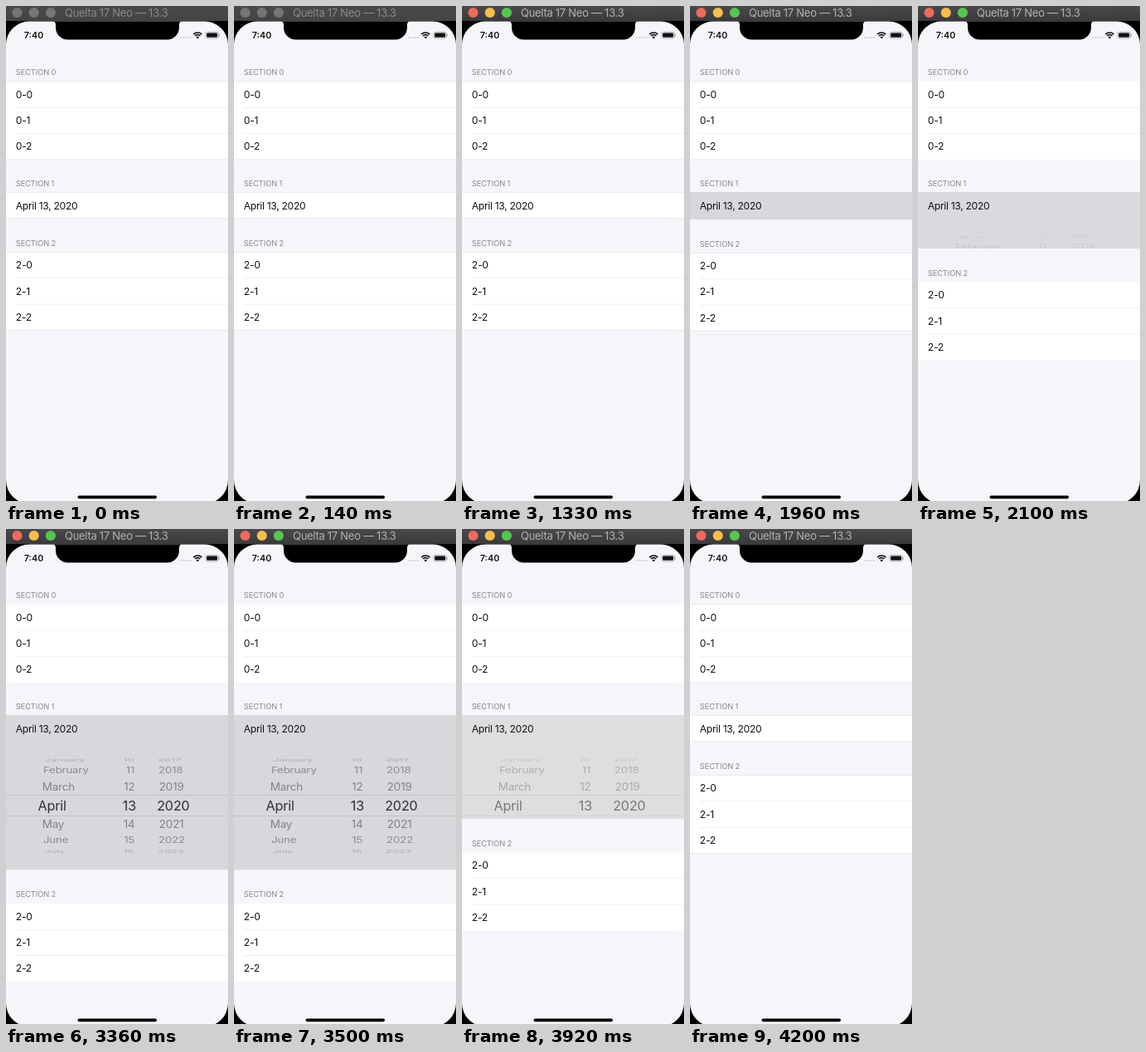
Recreate the animation shown at these times as an HTML page with a canvas. Size 268 by 596 pixels, loop 4970 ms.

```html
<!DOCTYPE html>
<html lang="en">
<head>
<meta charset="utf-8">
<title>Inline date picker</title>
<style>
  html, body { margin: 0; width: 100%; height: 100%; overflow: hidden; background: #000; }
  canvas { display: block; width: 268px; height: 596px; }
</style>
</head>
<body>
<canvas id="stage"></canvas>
<script>
const W = 268, H = 596, LOOP = 4970, STEP = 70;
const ROW = 31.4, PICKER = 154.4, CELL_TOP = 224.5;
const FONT = 'Inter, Roboto, sans-serif';
const BACK = '#f6f5fa', LINE = '#e6e5e9', PRESSED = '#d9d7db';

const canvas = document.getElementById('stage');
const dpr = window.devicePixelRatio || 1;
canvas.width = W * dpr;
canvas.height = H * dpr;
const ctx = canvas.getContext('2d');

function rect(x, y, w, h, color) {
  ctx.fillStyle = color;
  ctx.fillRect(x, y, w, h);
}

function disc(x, y, r, color) {
  ctx.fillStyle = color;
  ctx.beginPath();
  ctx.arc(x, y, r, 0, Math.PI * 2);
  ctx.fill();
}

function pill(x, y, w, h, r, color) {
  ctx.fillStyle = color;
  ctx.beginPath();
  ctx.roundRect(x, y, w, h, r);
  ctx.fill();
}

// y is the middle of the capitals
function text(str, x, y, size, color, { weight = 400, spacing = 0, align = 'left' } = {}) {
  ctx.font = `${weight} ${size}px ${FONT}`;
  ctx.letterSpacing = spacing + 'px';
  ctx.textAlign = align;
  ctx.fillStyle = color;
  ctx.fillText(str, x, y + size * 0.364);
}

// cubic-bezier(.42, 0, .58, 1)
function easeInOut(x) {
  if (x <= 0) return 0;
  if (x >= 1) return 1;
  let lo = 0, hi = 1;
  for (let i = 0; i < 20; i++) {
    const s = (lo + hi) / 2, r = 1 - s;
    if (1.26 * s * r * r + 1.74 * s * s * r + s * s * s < x) lo = s; else hi = s;
  }
  return lo * lo * (3 - 2 * lo);
}

function titleBar(active) {
  const shade = ctx.createLinearGradient(0, 0, 0, 18);
  shade.addColorStop(0, active ? '#4a494b' : '#4b484b');
  shade.addColorStop(1, active ? '#3b393b' : '#464346');
  rect(0, 0, W, 18, shade);
  const lights = active ? ['#ec6a5e', '#f5bf4f', '#58c553'] : ['#777477', '#777477', '#777477'];
  lights.forEach((color, i) => disc(13.5 + i * 20.2, 8, 6.1, color));
  text('Quelta 17 Neo — 13.3', 71, 8.6, 13, active ? '#b4b2b4' : '#8b898b', { spacing: -0.28 });
}

function notch() {
  ctx.fillStyle = '#000';
  ctx.beginPath();
  ctx.moveTo(56, 18);
  ctx.quadraticCurveTo(60, 18.5, 60, 23);
  ctx.lineTo(60, 26);
  ctx.arcTo(60, 40.6, 75, 40.6, 14.5);
  ctx.lineTo(194, 40.6);
  ctx.arcTo(209, 40.6, 209, 26, 14.5);
  ctx.lineTo(209, 23);
  ctx.quadraticCurveTo(209, 18.5, 213, 18);
  ctx.fill();
}

function statusBar() {
  text('7:40', 33.5, 35.6, 10.7, '#111', { weight: 600, align: 'center' });
  for (let i = 0; i < 4; i++) disc(211.3 + i * 3.5, 38, 1.1, '#c9c8cd');

  ctx.strokeStyle = '#111';
  ctx.lineWidth = 1.7;
  for (const r of [7.2, 4.5]) {
    ctx.beginPath();
    ctx.arc(231.3, 39.2, r, -Math.PI * 0.75, -Math.PI * 0.25);
    ctx.stroke();
  }
  ctx.fillStyle = '#111';
  ctx.beginPath();
  ctx.moveTo(231.3, 39.4);
  ctx.arc(231.3, 39.4, 2.6, -Math.PI * 0.75, -Math.PI * 0.25);
  ctx.fill();

  ctx.strokeStyle = '#a3a2a6';
  ctx.lineWidth = 0.8;
  ctx.beginPath();
  ctx.roundRect(240.9, 31.4, 15.6, 7.6, 2.2);
  ctx.stroke();
  pill(242.2, 32.6, 13, 5.2, 1.2, '#111');
  rect(257.1, 33.9, 0.9, 2.6, '#a3a2a6');
}

function header(n, y) {
  text('SECTION ' + n, 11.8, y, 9.3, '#88878c', { spacing: -0.1 });
}

function label(str, y) {
  text(str, 11.8, y, 12.1, '#111', { spacing: -0.3 });
}

function edges(top, bottom) {
  rect(0, top - 0.5, W, 0.8, LINE);
  rect(0, bottom - 0.6, W, 0.8, LINE);
}

function section(n, top, framed) {
  const bottom = top + ROW * 3 - 0.2;
  header(n, top - 11.2);
  rect(0, top, W, bottom - top, '#fff');
  for (let i = 0; i < 3; i++) {
    label(`${n}-${i}`, top + ROW * (i + 0.5) - 0.5);
    if (i) rect(11.8, top + ROW * i - 0.6, W, 0.8, '#ebeaee');
  }
  if (framed) edges(top, bottom);
}

// Rows sit on a drum seen from the front
function picker(alpha) {
  const mid = 332.8, radius = 60, turn = 22.3 * Math.PI / 180;
  const months = ['January', 'February', 'March', 'April', 'May', 'June', 'July'];
  const ink = [0.78, 0.4, 0.36, 0.2];
  ctx.save();
  ctx.globalAlpha = alpha;
  months.forEach((month, i) => {
    const k = i - 3, big = k === 0, squash = Math.cos(k * turn);
    const size = big ? 16.2 : 13.5, color = `rgba(0,0,0,${ink[Math.abs(k)]})`;
    const spread = big ? 1 : 0.94 + 0.065 * squash;
    ctx.save();
    ctx.translate(W / 2, mid + radius * Math.sin(k * turn));
    ctx.scale(spread, squash);
    text(month, big ? -95.4 : -90.3, 0, size, color, { spacing: -0.2 });
    text(String(13 + k), big ? 23 : 21.5, 0, size, color, { spacing: -0.2, align: 'right' });
    text(String(2020 + k), big ? 48.2 : 50.8, 0, size, color, { spacing: -0.2 });
    ctx.restore();
  });
  rect(0, 320, W, 0.8, 'rgba(0,0,0,.13)');
  rect(0, 345, W, 0.8, 'rgba(0,0,0,.13)');
  ctx.restore();
}

function dateCell(open, press, framed) {
  const height = ROW + PICKER * open;
  header(1, CELL_TOP - 10.8);
  ctx.save();
  ctx.beginPath();
  ctx.rect(0, CELL_TOP - 0.5, W, height + 0.7);
  ctx.clip();
  rect(0, CELL_TOP - 0.5, W, height + 1, '#fff');
  ctx.globalAlpha = press;
  rect(0, CELL_TOP - 0.5, W, height + 1, PRESSED);
  ctx.globalAlpha = 1;
  if (open > 0) picker(open);
  label('April 13, 2020', 240.1);
  ctx.restore();
  if (framed && press < 0.5) edges(CELL_TOP, CELL_TOP + height);
}

function draw(t) {
  const opening = easeInOut((t - 1933) / 500);
  const closing = easeInOut((t - 3700) / 500);
  const open = opening - closing;
  let press = 0;
  if (t >= 3360) press = 1 - closing ** 2;
  else if (t >= 1470) press = 1 - opening ** 2;
  const framed = open < 0.02;

  ctx.setTransform(dpr, 0, 0, dpr, 0, 0);
  rect(0, 0, W, H, '#000');
  ctx.save();
  ctx.beginPath();
  ctx.roundRect(0, 18.5, W, 580.5, 28);
  ctx.clip();
  rect(0, 18, W, H, BACK);
  section(0, 91, framed);
  dateCell(open, press, framed);
  section(2, 296.6 + PICKER * open, framed);
  statusBar();
  notch();
  pill(86.5, 589.6, 95.5, 3.6, 1.8, '#000');
  ctx.restore();
  titleBar(t >= 1330);
}

const start = performance.now();
function tick() {
  const t = (performance.now() - start) % LOOP;
  draw(Math.floor(t / STEP) * STEP);
  requestAnimationFrame(tick);
}
tick();
</script>
</body>
</html>
```
